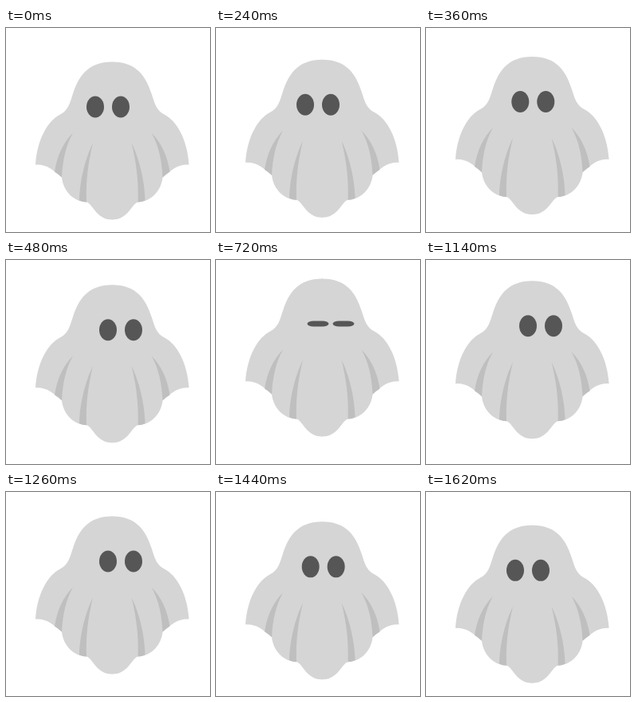
Recreate the animation shown at these times as an HTML page. Size 256x256 px, loop 1.68 s.

```html
<!DOCTYPE html>
<html lang="en">
<head>
<meta charset="utf-8">
<title>Ghost</title>
<style>
  html, body { margin: 0; height: 100%; overflow: hidden; background: #fff; }
  svg { display: block; width: 100vw; height: 100vh; }
</style>
</head>
<body>
<svg viewBox="0 0 256 256">
  <defs>
    <g id="half">
      <path fill="#d5d5d5" d="M134 42H133.3C103 42 91 60 84 82C80 94 78 103 68 108C52 116 39 140 37 171
        C50 170 59 177 70 187C72 204 84 217 101 218C109 220 113 240 133.3 240H134Z"/>
      <path fill="#bfbfbf" d="M84 131C72 143 64 160 61 180Q66 183 70 187C71 166 75 147 84 131Z
        M109 144C100 162 92.500 190 92 216Q96 218 101 218C100 192 103 169 109 144Z"/>
    </g>
  </defs>
  <g id="ghost">
    <use href="#half"/>
    <use href="#half" transform="matrix(-1 0 0 1 266.600 0)"/>
    <g fill="#565656">
      <rect class="eye"/>
      <rect class="eye"/>
    </g>
  </g>
</svg>
<script>
  const LOOP = 1680, STEP = 60;
  const ghost = document.getElementById('ghost');
  const eyes = document.querySelectorAll('.eye');

  const mix = (a, b, k) => a + (b - a) * k;
  const ease = (t, from, to) => {
    const k = Math.min(1, Math.max(0, (t - from) / (to - from)));
    return k * k * (3 - 2 * k);
  };

  function draw(t) {
    const drop = 0.6 - 10.5 * (1 - Math.cos((t - 40) / LOOP * 2 * Math.PI));
    const look = 16 * (ease(t, 270, 480) - ease(t, 1290, 1560));
    const shut = ease(t, 600, 720) - ease(t, 720, 840);
    const halfW = mix(11, 13.5, shut), halfH = mix(13.5, 3.5, shut);

    ghost.setAttribute('transform', `translate(0 ${drop})`);
    eyes.forEach((eye, i) => {
      const box = {
        x: 112 + 32 * i + look - halfW, y: 98.5 - halfH,
        width: 2 * halfW, height: 2 * halfH,
        rx: mix(11, 8, shut), ry: halfH
      };
      for (const name in box) eye.setAttribute(name, box[name]);
    });
  }

  const start = performance.now();
  function tick() {
    const t = (performance.now() - start) % LOOP;
    draw(Math.floor(t / STEP) * STEP);
    requestAnimationFrame(tick);
  }
  tick();
</script>
</body>
</html>
```
